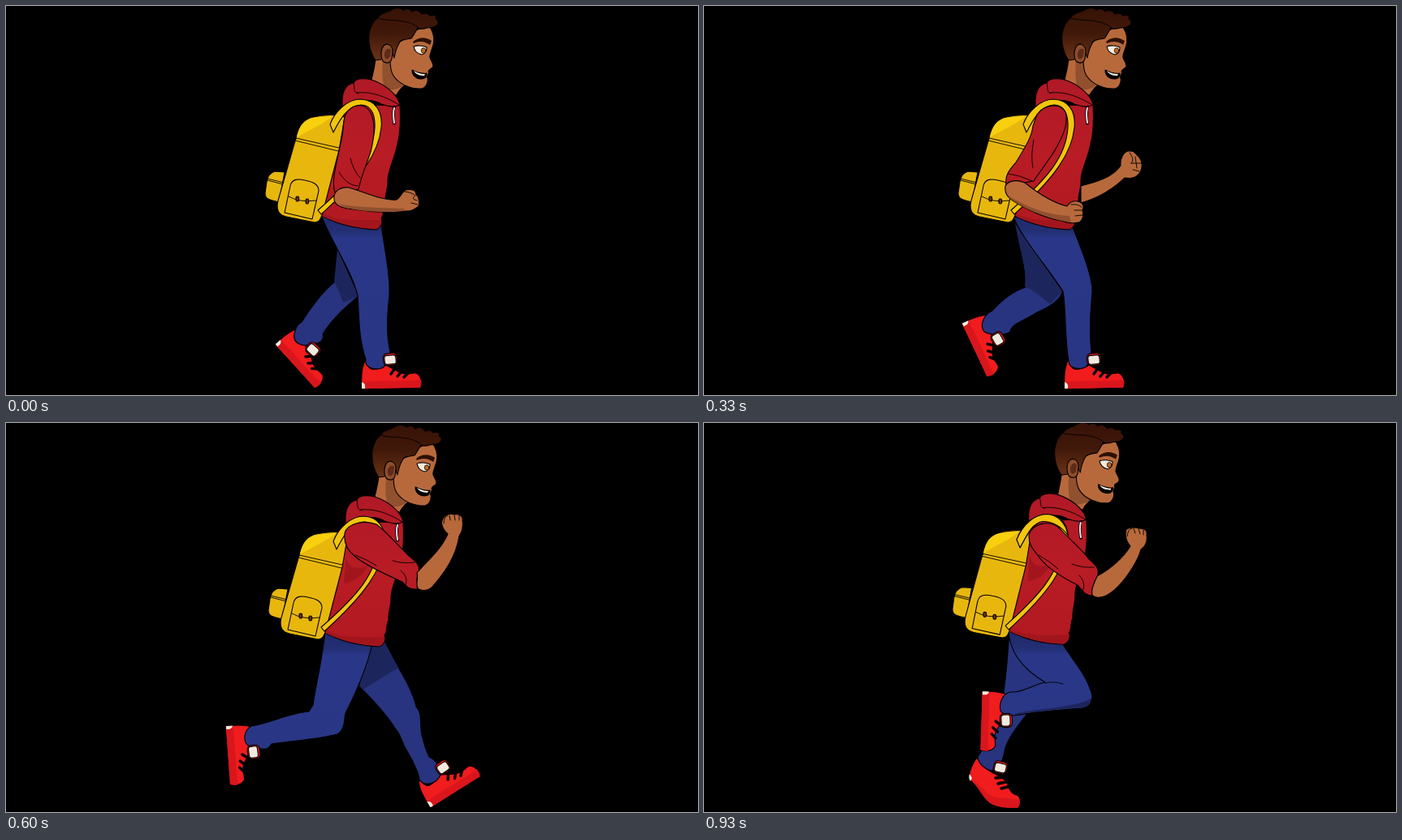
Animation, 852 px wide and 480 px high, one loop 990 ms. Source, as an HTML page without scripts:

```html
<!DOCTYPE html>
<html lang="en">
<head>
<meta charset="utf-8">
<title>Running student</title>
<style>
  html, body { margin: 0; width: 100%; height: 100%; overflow: hidden; background: #000; }
  svg { display: block; width: 100%; height: 100%; }
  path, rect, ellipse { stroke: #000; stroke-width: 1.1; stroke-linejoin: round; stroke-linecap: round; }
  .flat { stroke: none; }
  .line { fill: none; stroke-width: .9; }
  .thick { fill: none; stroke-width: 3.4; }
  .red { fill: url(#cloth); }
  .shade { fill: #a3151d; stroke: none; }
  .yellow { fill: #e8b70e; }
  .light { fill: #f8d00e; stroke: none; }
  .strap { fill: #f2c50e; }
  .skin { fill: #b8693c; }
  .skin-dark { fill: #91502e; stroke: none; }
  .jeans { fill: url(#denim); }
  .far { fill: #28347f; }
  .dusk { fill: url(#dusk); }
  .deep { fill: #1d265c; stroke: none; }
  .shoe { fill: #f01c1e; }
  .sole { fill: #d9161c; stroke: none; }
  .white { fill: #f2eadf; }
  /* five held poses, one fifth of the loop each */
  .pose { animation: hold 990ms step-end infinite; animation-delay: calc(var(--i) * 198ms - 990ms); }
  @keyframes hold { 0% { visibility: visible; } 20%, 100% { visibility: hidden; } }
</style>
</head>
<body>
<svg viewBox="0 0 852 480">
  <defs>
    <linearGradient id="cloth" gradientUnits="userSpaceOnUse" x1="0" y1="90" x2="0" y2="275">
      <stop stop-color="#b01926"/><stop offset=".5" stop-color="#b81c25"/><stop offset="1" stop-color="#b21920"/>
    </linearGradient>
    <linearGradient id="denim" gradientUnits="userSpaceOnUse" x1="0" y1="260" x2="0" y2="440">
      <stop stop-color="#1f2a6c"/><stop offset=".1" stop-color="#232f74"/>
      <stop offset=".15" stop-color="#2a3788"/><stop offset="1" stop-color="#293685"/>
    </linearGradient>
    <linearGradient id="dusk" gradientUnits="userSpaceOnUse" x1="0" y1="270" x2="0" y2="390">
      <stop stop-color="#1f2964"/><stop offset="1" stop-color="#2a356f"/>
    </linearGradient>
    <linearGradient id="hair" x1="0" y1="0" x2="0" y2="1">
      <stop stop-color="#371206"/><stop offset=".5" stop-color="#41190a"/><stop offset="1" stop-color="#6a3216"/>
    </linearGradient>

    <g id="tongue">
      <rect class="shoe" x="-8.5" y="-7.5" width="17" height="15" rx="5"/>
      <rect class="white" x="-7" y="-5" width="14" height="11" rx="3"/>
    </g>

    <!-- origin: bottom of the heel -->
    <g id="shoe">
      <path class="shoe" d="M0 0C-1-14 0-29 5-37C8-36 6-27 12-25C18-24 26-27 30-30C37-26 42-23 49-20C57-17 61-21 67-20C73-17 75-8 72-2Z"/>
      <path class="sole" d="M1-9C25-12 50-9 73-12C74-8 73-4 72-2L1-1Z"/>
      <path class="white flat" d="M0-1V-9Q5-8 4-1Z"/>
      <path class="thick" d="M41-26L36-19M49-22L44-16M57-20L52-15"/>
    </g>

    <g id="bent-shoe">
      <path class="shoe" d="M344 413C336 424 333 435 336 441C345 449 351 462 360 469C370 475 385 476 395 475C399 470 398 461 393 459C385 457 383 450 381 443C370 432 355 432 344 413Z"/>
      <path class="sole" d="M339 441C352 450 357 459 366 462C378 464 388 462 397 466L395 474C385 476 370 475 360 469C350 461 346 450 339 441Z"/>
      <path class="white flat" d="M335 433L338 438L336 442Q333 438 335 433Z"/>
      <path class="thick" d="M378 437L367 438M380 443L370 445M382 449L374 451"/>
    </g>

    <g id="head">
      <path class="skin" d="M455 64C454 78 450 88 449 97C462 103 472 109 481 110C483 104 488 101 491 97L478 62Z"/>
      <path class="skin-dark" d="M464 66C463 80 463 92 466 101C474 106 484 102 490 98C479 90 474 80 472 66Z"/>
      <path class="skin" d="M478 40L520 24C526 30 528 40 526 48C524 56 521 60 522 64C524 69 528 73 525 76C522 79 520 78 520 81C522 84 517 86 519 89C520 95 517 101 512 102C500 103 484 97 477 86C472 78 473 64 474 58Z"/>
      <path fill="url(#hair)" d="M455 67C447 56 446 42 447 34C449 24 453 18 457 15C461 8 470 8 474 5C480 1 486 2 489 5C494 2 498 4 500 7C505 4 509 6 512 10C517 8 520 9 522 12C528 10 531 13 529 16C533 18 533 22 530 24C526 28 521 26 518 27C513 29 508 28 507 27C504 32 502 36 499 40C491 41 485 42 484 46C480 53 479 58 478 64L473 52L462 66Z"/>
      <path class="line" d="M457 15C473 20 492 14 508 27"/>
      <path fill="#8f4e2c" d="M476 55C475 48 469 45 465 49C461 54 461 63 464 68C469 72 474 70 475 65Z"/>
      <path fill="#5f2b18" class="flat" d="M474 54C469 50 465 56 466 62C467 67 471 66 473 62Z"/>
      <path fill="#2c1006" class="flat" d="M501 44C508 38 517 38 524 43L522 48C515 43 509 43 502 46Z"/>
      <path class="white" d="M502 50C507 48 514 49 518 51C518 56 516 59 512 60C507 59 503 56 502 50Z"/>
      <ellipse fill="#c5681c" cx="514" cy="55" rx="2.8" ry="3.2" style="stroke-width:.7"/>
      <path d="M500 79C506 82 512 84 518 83C518 88 516 90 511 90C505 90 500 86 500 79Z"/>
      <path class="white flat" d="M502 80C507 83 512 84 516 84L515 86C510 86 505 85 502 80Z"/>
    </g>

    <g id="body">
      <path class="red" d="M414 123L485 122C486 140 486 155 482 170C478 190 470 203 470 215C471 225 466 232 467 243C463 252 466 258 462 262C465 267 460 274 456 276C430 275 405 268 387 258L403 170Z"/>
      <path class="shade" d="M415 165C417 182 432 180 441 176C436 188 425 196 412 198Z"/>
      <path class="shade" d="M389 255C410 267 440 264 462 264C463 269 460 274 456 275C430 274 405 267 389 259Z"/>
      <path class="yellow" d="M343 205L331 204C324 206 322 211 321 217L319 231C319 238 323 239 336 242Z"/>
      <path class="line" d="M322 213L342 218M322 215L341 220"/>
      <path class="yellow" d="M357 163L335 240C332 252 336 258 345 260L380 267C386 267 388 262 390 255L410 178L417 137C405 133 388 135 378 137C366 140 360 148 357 163Z"/>
      <path class="light" d="M358 162C361 148 367 140 378 138L402 136C392 145 375 152 358 162Z"/>
      <path class="line" d="M357 163L410 175M356 166L409 179M357 164Q352 170 350 176"/>
      <path class="yellow" d="M350 222C352 213 360 213 368 215C378 217 385 220 385 228L377 263L343 255Z"/>
      <path class="line" d="M348 235Q362 243 382 240"/>
      <rect fill="#6e3210" x="357" y="235" width="3.6" height="6" rx="1.5"/>
      <rect fill="#6e3210" x="369" y="238" width="3.6" height="6" rx="1.5"/>
      <use href="#head"/>
      <path class="red" d="M414 123C413 106 418 97 428 95C430 90 438 88 450 91C465 96 482 108 485 122C478 126 470 124 462 121C448 112 430 118 414 128Z"/>
      <path class="line" d="M428 95C430 104 427 106 434 108M432 107C450 105 468 112 484 122"/>
      <path class="thick" d="M478 125C476 132 477 138 478 145"/>
      <path class="line" style="stroke:#e8e4ea;stroke-width:2" d="M478 126C476 132 477 138 478 144"/>
      <path class="strap" d="M399 146C405 130 420 115 437 115C455 116 464 130 462 150C459 180 440 210 388 257L384 252C430 212 452 185 454 150C455 130 447 122 437 122C420 123 410 142 403 156Z"/>
    </g>
    <path id="shoulder" class="strap" d="M399 146C407 126 422 115 437 115C450 116 460 127 462 141C455 132 445 124 431 124C418 126 412 140 403 156Z"/>
  </defs>

  <g class="pose" style="--i:0">
    <use href="#shoe" transform="translate(331 418) rotate(49)"/>
    <path class="far" d="M408 300L434 358C415 374 400 388 390 405C392 412 386 418 376 416C370 422 352 418 355 404C358 394 360 392 364 390C380 365 395 348 404 341Z"/>
    <path class="deep" d="M408 300L434 358L415 366Q410 350 404 341Z"/>
    <use href="#tongue" transform="translate(378 424) rotate(42)"/>
    <use href="#shoe" transform="translate(438 473)"/>
    <path class="jeans" d="M388 258C400 290 425 325 433 357C435 385 434 410 443 436C440 450 464 450 466 444L473 427C468 405 469 385 472 355C473 330 466 300 462 270Z"/>
    <use href="#tongue" transform="translate(473 436) rotate(-5)"/>
    <use href="#body"/>
    <path class="red" d="M418 134C424 122 440 118 448 130C455 142 454 160 449 180C444 195 438 208 434 226L405 230C400 215 408 190 413 165C416 155 414 144 418 134Z"/>
    <path class="line" d="M424 188Q428 204 436 212M410 205Q420 222 433 222"/>
    <path class="skin" d="M404 238C403 228 412 223 422 224C440 229 465 241 481 239C486 236 487 230 492 227C498 226 505 226 505 233C509 235 509 245 508 247C505 250 498 254 492 253C470 257 440 252 420 250C410 248 404 244 404 238Z"/>
    <path class="skin-dark" d="M408 244C435 249 465 249 490 250L491 252C465 256 435 253 420 249Z"/>
    <path class="line" d="M491 229Q500 230 504 234M503 235Q498 238 506 240M499 243L507 245"/>
  </g>

  <g class="pose" style="--i:1">
    <path class="skin" d="M464 222C485 217 503 211 513 197C512 188 517 180 522 179C530 178 531 182 536 187C540 192 540 200 537 205C532 213 525 213 518 212C505 225 485 237 464 243Z"/>
    <path class="line" d="M524 181Q531 190 526 194M531 186L533 200M526 194L538 194M528 202L536 204"/>
    <use href="#shoe" transform="translate(317 392) rotate(66)"/>
    <path class="far" d="M383 268C388 300 396 320 396 347C380 352 365 365 355 376C342 382 340 396 345 402C355 407 370 407 377 402C378 392 395 388 410 378C425 372 440 362 441 352Z"/>
    <path class="deep" d="M383 268C388 300 398 320 395 346Q408 352 426 368L441 352Z"/>
    <use href="#tongue" transform="translate(362 411) rotate(60)"/>
    <use href="#shoe" transform="translate(444 473)"/>
    <path class="jeans" d="M381 260C390 285 425 325 442 352C446 375 444 410 449 438C449 450 470 449 472 443L477 428C474 400 476 375 478 352C478 330 462 295 453 270Z"/>
    <use href="#tongue" transform="translate(480 436) rotate(-5)"/>
    <use href="#body" x="-6"/>
    <path class="red" d="M410 134C418 122 438 118 445 131C451 148 434 176 422 193C416 202 411 208 406 216L372 222C370 208 377 201 384 193C397 172 404 160 405 148Z"/>
    <path class="line" d="M406 165Q402 185 405 200M375 207Q390 209 404 216"/>
    <path class="skin" d="M371 222C375 215 385 214 395 218C410 230 430 243 447 247C450 242 455 240 460 241C468 243 468 248 466 252C468 258 466 266 461 267C453 269 447 267 440 265C420 262 395 250 380 240C372 235 370 228 371 222Z"/>
    <path class="skin-dark" d="M375 234C400 250 425 258 450 259L452 267C425 263 395 252 375 236Z"/>
    <path class="line" d="M452 245Q460 244 465 248M456 252H466M457 259L466 258"/>
  </g>

  <g class="pose" style="--i:2">
    <path class="dusk" d="M445 272C455 295 470 325 472 352C470 362 455 368 440 373C425 378 410 384 401 389L390 385L412 340Z"/>
    <path d="M412 350L420 335L428 338Q418 344 410 355Z"/>
    <path class="shoe" d="M390 387C378 398 372 410 366 425L380 447C388 446 386 432 384 424L398 402Z"/>
    <path class="thick" d="M389 404L379 403M387 411L377 410M384 418L374 417"/>
    <use href="#tongue" transform="translate(393 395) rotate(52) scale(.9)"/>
    <use href="#bent-shoe"/>
    <path class="jeans" d="M384 255C382 290 380 320 375 345C362 362 360 385 345 414C347 422 355 428 363 430C372 424 378 424 380 412C380 405 386 395 395 380C405 370 412 360 412 348C425 325 440 295 448 270Z"/>
    <use href="#tongue" transform="translate(373 425) rotate(12)"/>
    <use href="#body" transform="translate(-5 -2) rotate(-.6 390 240)"/>
    <path class="red" d="M409 140C412 124 428 121 440 128C448 134 449 150 450 165C452 185 457 195 462 212L463 221C452 222 445 228 440 240C434 232 436 220 430 210C420 190 411 165 409 140Z"/>
    <path class="line" d="M418 172Q430 198 456 210M432 208Q438 216 437 230M440 192Q448 204 458 207"/>
    <use href="#shoulder" transform="translate(-5 -2) rotate(-.6 390 240)"/>
    <path class="skin" d="M440 236C441 226 450 220 465 220C485 219 500 215 510 210C509 200 512 193 520 191C527 192 530 194 534 202C538 206 538 209 533 211C528 217 522 220 516 220C500 230 475 242 455 246C443 246 439 242 440 236Z"/>
    <path class="skin-dark" d="M441 240C465 240 492 229 514 218L515 220C500 230 475 242 455 245C446 245 442 243 441 240Z"/>
    <path class="line" d="M513 195Q519 194 523 203M522 193L529 204M528 196L535 207"/>
  </g>

  <g class="pose" style="--i:3">
    <use href="#shoe" transform="translate(523 475) rotate(-31)"/>
    <path class="far" d="M446 272L463 266C475 290 500 325 505 350C513 358 509 370 512 385C515 398 517 404 521 412C530 416 535 425 535 434C530 446 515 449 509 440C508 430 500 415 490 398C485 385 483 381 478 375C465 355 445 335 435 325Z"/>
    <path class="deep" d="M448 272L465 268L483 302Q460 316 441 328L435 325Z"/>
    <use href="#tongue" transform="translate(538 425) rotate(-34)"/>
    <use href="#shoe" transform="translate(270 374) rotate(87)"/>
    <path class="jeans" d="M393 256C390 290 382 320 378 348L373 356C350 358 325 370 302 374C292 380 292 393 298 398C308 398 320 409 327 396C355 392 385 390 408 384C418 378 416 365 418 358C430 335 445 300 451 272Z"/>
    <use href="#tongue" transform="translate(305 406) rotate(83)"/>
    <use href="#body" x="4"/>
    <path class="red" d="M417 136C420 124 440 119 456 125C466 132 480 148 495 163C505 171 511 176 508 186C503 192 508 200 506 205C495 206 492 200 488 196C470 188 440 175 428 163C418 155 416 146 417 136Z"/>
    <path class="line" d="M476 170Q490 174 503 172M486 182Q496 190 492 200M430 163Q444 168 456 176"/>
    <path class="skin" d="M506 185C515 173 535 158 544 137C536 130 536 123 537 120C540 113 545 111 552 113C558 112 563 115 562 120C563 128 562 134 558 139C554 165 540 185 524 203C518 208 510 207 507 204C504 198 508 192 506 185Z"/>
    <path class="line" d="M539 124Q539 115 544 114M546 114L547 120M552 114L553 120M558 114V120"/>
  </g>

  <g class="pose" style="--i:4">
    <use href="#bent-shoe" x="-8"/>
    <path class="far" d="M376 255C374 290 372 310 369 332L372 355C365 375 350 392 337 412C338 422 348 428 354 429C366 425 368 415 370 405C372 392 385 375 397 360L440 320Z"/>
    <use href="#tongue" transform="translate(365 425) rotate(12)"/>
    <use href="#shoe" transform="translate(342 331) rotate(93)"/>
    <path class="jeans" d="M375 256C376 285 395 305 420 320C405 323 392 333 378 332C368 333 363 345 365 355C368 361 376 360 382 361C410 356 440 354 465 352C477 350 480 338 476 330C470 310 455 295 440 270Z"/>
    <path class="deep" d="M383 359C410 351 450 353 477 340C476 347 473 351 465 351C440 353 410 355 383 360Z"/>
    <path class="line" d="M420 321Q430 318 442 322"/>
    <use href="#tongue" transform="translate(372 367) rotate(88)"/>
    <use href="#body" transform="translate(-13 -2) rotate(-.6 390 240)"/>
    <path class="red" d="M400 138C403 125 425 118 438 130C448 142 465 155 474 168C482 175 488 180 484 190C478 197 480 205 478 213C468 213 465 205 460 200C440 190 420 178 410 162C402 152 400 148 400 138Z"/>
    <path class="line" d="M453 174Q466 179 480 178M462 188Q470 196 467 206M412 163Q425 170 436 180"/>
    <use href="#shoulder" transform="translate(-13 -2) rotate(-.6 390 240)"/>
    <path class="skin" d="M484 189C500 180 515 168 525 152C519 145 518 138 520 131C525 128 532 129 536 130C543 130 546 133 545 138C546 145 544 152 538 156C534 172 515 200 500 210C492 216 482 217 478 212C476 204 481 197 484 189Z"/>
    <path class="line" d="M521 140Q522 130 527 130M529 130L531 136M535 130L537 137M541 131V138"/>
  </g>
</svg>
</body>
</html>
```
